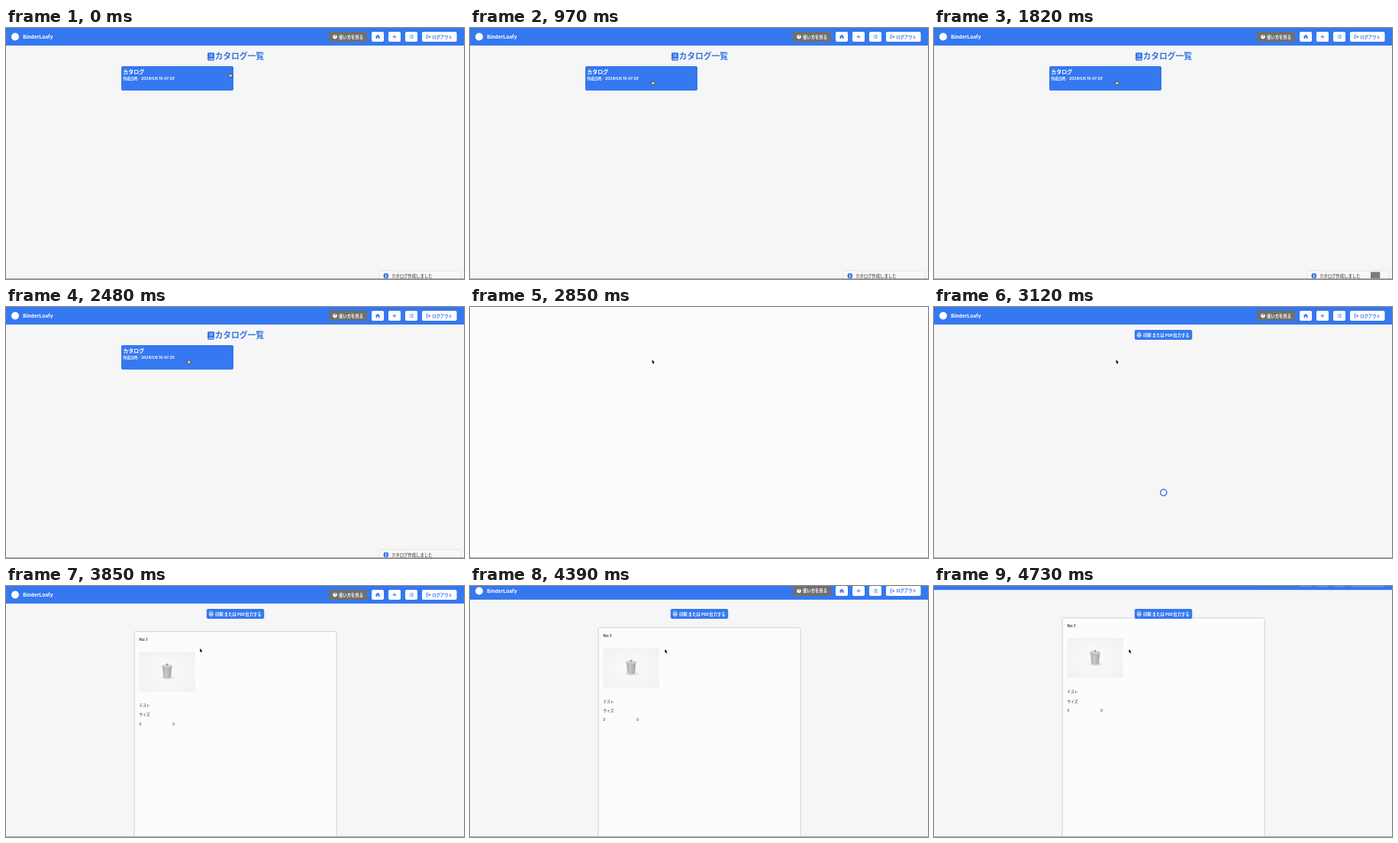
Animation, 600 px wide and 329 px high, one loop 5 s. Source, as an HTML page:

```html
<!DOCTYPE html>
<html lang="ja">
<head>
<meta charset="utf-8">
<title>カタログ一覧</title>
<style>
  html, body { margin: 0; width: 100%; height: 100%; overflow: hidden; background: #f6f6f6; }
  svg { display: block; width: 100vw; height: 100vh; }
  text { font-family: Inter, "Noto Sans CJK JP", "Noto Sans CJK", sans-serif; white-space: pre; }
</style>
</head>
<body>
<svg id="stage" viewBox="0 0 600 329">
  <defs>
    <radialGradient id="studio" cx=".5" cy=".5" r=".7">
      <stop offset="0" stop-color="#fafbfa"/>
      <stop offset="1" stop-color="#f0f2f1"/>
    </radialGradient>
    <linearGradient id="metal">
      <stop offset="0" stop-color="#a9adad"/>
      <stop offset=".4" stop-color="#c6caca"/>
      <stop offset="1" stop-color="#9da2a2"/>
    </linearGradient>
  </defs>
  <rect id="backdrop" width="600" height="329"/>
  <g id="list"></g>
  <g id="sheet"></g>
  <g id="nav"></g>
  <g id="print"></g>
  <circle id="spinner" cx="300.7" cy="243.2" r="4.1" fill="none" stroke="#3b79ec" stroke-width="1.5"/>
  <path d="M0 328.5H600" stroke="#a2a2a2" stroke-width=".9"/>
  <g id="hand">
    <path d="M-2.3-1.4Q-2.6-2.3-1.7-2.4L-.5-1.9 .9-1.9Q2.4-1.4 2.3.3L1.6 2.3H-.8L-2 .9Z" fill="#fff" stroke="#222" stroke-width=".8" stroke-linejoin="round"/>
    <path d="M-1.2-.5H.8M-.8.6H.9" stroke="#333" stroke-width=".5"/>
  </g>
  <path id="arrow" d="M0 0V4.5L1 3.6 1.8 5.4 2.7 5 1.9 3.3H3.3Z" fill="#000" stroke="#fff" stroke-width=".4" paint-order="stroke"/>
</svg>
<script>
const LOOP = 5000;
const BLUE = '#3578ef';
const el = id => document.getElementById(id);

const text = (x, y, size, content, fill = '#222', weight = 400) =>
  `<text x="${x}" y="${y}" font-size="${size}" font-weight="${weight}" fill="${fill}">${content}</text>`;
const box = (x, y, w, h, fill, extra = 'rx="2"') =>
  `<rect x="${x}" y="${y}" width="${w}" height="${h}" fill="${fill}" ${extra}/>`;
const line = (d, color, width = 0.9) =>
  `<path d="${d}" fill="none" stroke="${color}" stroke-width="${width}"/>`;
const badge = (x, y, r, fill, color, mark) =>
  `<circle cx="${x}" cy="${y}" r="${r}" fill="${fill}"/>` +
  `<text x="${x}" y="${y + r * 0.6}" font-size="${r * 1.7}" font-weight="800" text-anchor="middle" fill="${color}">${mark}</text>`;

el('nav').innerHTML =
  box(0, 0, 600, 23, BLUE, '') +
  '<circle cx="12" cy="11.5" r="5" fill="#fff"/>' +
  text(22.3, 13.8, 6.6, 'BinderLoafy', '#fff', 700) +
  box(423, 5, 50, 13, '#70706f') +
  badge(431, 11.5, 2.7, '#fff', '#70706f', '?') +
  text(436, 13.5, 5.35, '使い方を見る', '#fff', 700) +
  [479, 501, 523].map(x => box(x, 5, 16, 13, '#fff')).join('') +
  box(545, 5, 45.5, 13, '#fff') +
  `<path d="M487 8.7L490.2 11.6H489.4V14.2H487.8V12.3H486.2V14.2H484.6V11.6H483.8Z" fill="${BLUE}"/>` +
  line('M506.6 11.5H511.4M509 9.1V13.9', BLUE) +
  line('M528.5 9.6H529.5M530.3 9.6H533.7M528.5 11.5H529.5M530.3 11.5H533.7M528.5 13.4H529.5M530.3 13.4H533.7', BLUE, 0.8) +
  line('M552.8 9.2H551V13.8H552.8M552.4 11.5H555.8M554.2 9.7L556 11.5 554.2 13.3', BLUE) +
  text(558.2, 13.5, 5.35, 'ログアウト', BLUE, 700);

el('list').innerHTML =
  box(264, 32.3, 9, 10.4, '#3474e4', 'rx="1.4"') +
  line('M266.5 35H271.2M266.5 37H271.2', '#f6f6f6', 0.7) +
  line('M265.7 40.8H272.6', '#f6f6f6', 1) +
  text(273.4, 40.7, 10.8, 'カタログ一覧', '#3474e4', 700) +
  box(151, 50, 147, 32, '#3678ef') +
  text(153.3, 60.2, 7, 'カタログ', '#fff', 700) +
  text(153.3, 67.7, 4.75, '作成日時：2024/5/6 10:47:20', '#fff', 700) +
  box(489, 318, 107, 16, '#f8f8f8', 'rx="2" stroke="#dedede" stroke-width=".8"') +
  badge(497.8, 324.7, 3.4, BLUE, '#fff', 'i') +
  text(505, 326.8, 5.35, 'カタログ作成しました', '#222', 500) +
  box(572, 329, 12.3, 12, '#7b7b7b', 'id="tile"');

el('print').innerHTML =
  box(262.8, 30, 75.4, 13, BLUE) +
  line('M267 35.7V33.9H270.4V35.7M266.7 37.9H266.2V36.1H271.2V37.9H270.7M267.2 37.5H270.2V39.2H267.2Z', '#fff', 0.8) +
  text(274, 38.5, 5.3, '印刷 または PDF出力する', '#fff', 700);

el('sheet').innerHTML =
  box(168, 59.7, 265, 300, '#fcfcfc', 'rx="2" stroke="#cfcfcf" stroke-width=".9"') +
  text(174.5, 72.2, 5.4, 'No.1', '#222', 500) +
  box(174.5, 86, 73.5, 52.3, 'url(#studio)', '') +
  '<ellipse cx="212" cy="120" rx="9" ry="2.5" fill="#e3e6e5"/>' +
  '<path d="M205 106H217.2L216 119.7Q211 122.3 206.2 119.7Z" fill="url(#metal)"/>' +
  '<ellipse cx="211" cy="105.6" rx="7" ry="2.6" fill="#b4b9b8"/>' +
  '<ellipse cx="211" cy="104.8" rx="6.4" ry="2.1" fill="#cdd1d0"/>' +
  box(210.3, 101.6, 1.5, 2.8, '#858a89', 'rx=".6"') +
  text(174.5, 158.2, 4.7, 'テスト') +
  text(174.5, 170.4, 4.7, 'サイズ') +
  text(174.6, 182.5, 4.3, '0') +
  text(218.3, 182.5, 4.3, '0');

const progress = (t, start, end) => Math.min(1, Math.max(0, (t - start) / (end - start)));
const smooth = p => p * p * (3 - 2 * p);
const mix = (a, b, p) => a + (b - a) * p;
const show = (id, on) => el(id).setAttribute('display', on ? 'inline' : 'none');
const move = (id, x, y) => el(id).setAttribute('transform', `translate(${x} ${y})`);

const SCROLL = [[3910, 0], [4330, 2], [4390, 5], [4420, 7.5], [4480, 12], [4570, 15.5], [4730, 17.8]];
function scrollAt(t) {
  const next = SCROLL.findIndex(([time]) => time > t);
  if (next === 0) return 0;
  if (next < 0) return SCROLL.at(-1)[1];
  const [t0, y0] = SCROLL[next - 1], [t1, y1] = SCROLL[next];
  return mix(y0, y1, progress(t, t0, t1));
}

function backdropAt(t) {
  if (t < 2790 || t >= 3120) return '#f6f6f6';
  const p = progress(t, 2860, 3000);
  return `rgb(${mix(252, 218, p)} ${mix(252, 234, p)} ${mix(252, 248, p)})`;
}

function render(t) {
  const onList = t < 2790, loaded = t >= 3120, ready = t >= 3210;
  el('backdrop').setAttribute('fill', backdropAt(t));
  show('list', onList);
  show('nav', onList || loaded);
  show('print', loaded);
  show('spinner', loaded && !ready);
  show('sheet', ready);
  show('hand', onList);
  show('arrow', !onList);

  const scroll = scrollAt(t);
  move('nav', 0, -scroll);
  move('sheet', 0, -scroll);

  const glide = smooth(progress(t, 0, 610));
  move('hand', mix(294, 239.8, glide), mix(62.3, 72.2, glide));
  const drift = smooth(progress(t, 3340, 3960));
  move('arrow', mix(238.6, 255.4, drift), mix(69.3, 83, drift));

  // The tile hops once above the bottom edge.
  move('tile', 0, -Math.max(0, 10 * (1 - ((t - 1740) / 290) ** 2)));
}

const start = performance.now();
function tick() {
  render((performance.now() - start) % LOOP);
  requestAnimationFrame(tick);
}
tick();
</script>
</body>
</html>
```
